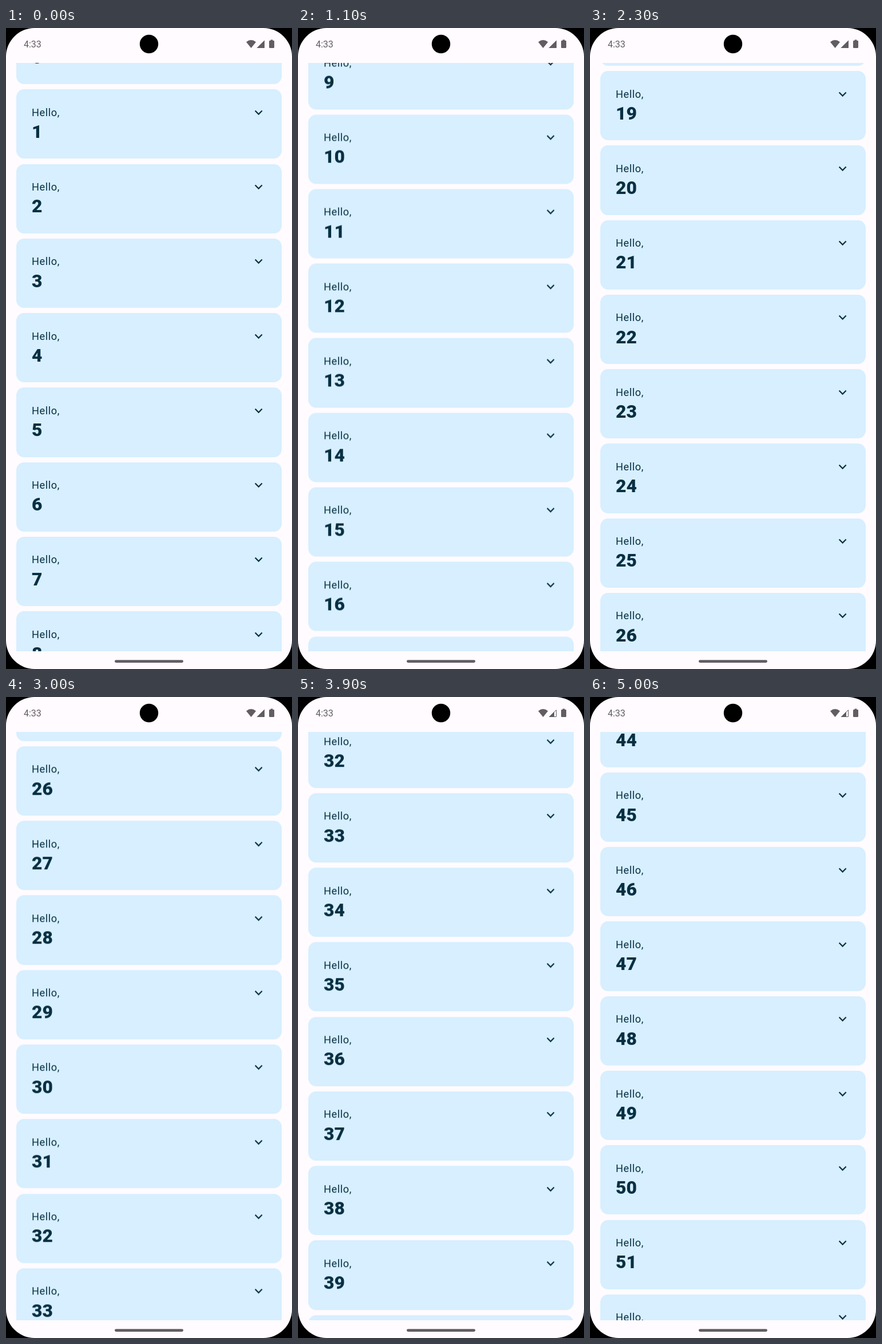
An HTML page that plays this animation: 500x1120 px, repeating every 5100 ms.

```html
<!DOCTYPE html>
<html lang="en">
<head>
<meta charset="utf-8">
<title>Greeting list</title>
<style>
  :root { --dp: 1.1364px; --pitch: 130.28px; }
  html, body { margin: 0; width: 500px; height: 1120px; overflow: hidden; background: #000; }
  .screen {
    position: relative; width: 500px; height: 1120px; overflow: hidden;
    border-radius: 50px; background: #fffbfe; font-family: Roboto, sans-serif;
  }
  .view { position: absolute; left: 0; top: 61px; width: 500px; height: 1027.5px; overflow: hidden; }
  .list { position: absolute; left: 18px; top: -61px; width: 464px; animation: scroll 5100ms infinite; }
  .card {
    position: relative; box-sizing: border-box; height: 121.2px;
    margin-bottom: calc(var(--pitch) - 121.2px); padding: 26.5px 27px;
    border-radius: calc(12 * var(--dp)); background: #d7efff; color: #073042;
  }
  .hello { font-size: calc(16 * var(--dp)); line-height: calc(24 * var(--dp)); letter-spacing: calc(.5 * var(--dp)); }
  .number { font-size: calc(28 * var(--dp)); line-height: calc(36 * var(--dp)); font-weight: 800; }
  .card svg { position: absolute; left: 410.4px; top: 26.5px; width: calc(24 * var(--dp)); height: calc(24 * var(--dp)); fill: #073042; }
  .chrome { position: absolute; left: 0; top: 0; fill: #615d62; }
  .chrome text { font: 16px Roboto, sans-serif; }
  .full { animation: weaken 5100ms step-end infinite; }

  /* Ten positions per second between the measured scroll offsets */
  @keyframes scroll {
    0% { transform: translateY(-23px); animation-timing-function: steps(11); }
    21.568% { transform: translateY(-1151.5px); animation-timing-function: steps(12); }
    45.098% { transform: translateY(-2400px); animation-timing-function: steps(7); }
    58.823% { transform: translateY(-3300.8px); animation-timing-function: steps(5); }
    68.627% { transform: translateY(-3677.2px); animation-timing-function: steps(8); }
    84.313% { transform: translateY(-4584.5px); animation-timing-function: steps(7); }
    98.039%, 100% { transform: translateY(-5730.1px); }
  }
  @keyframes weaken {
    0% { opacity: 1; }
    76.47%, 100% { opacity: 0; }
  }
</style>
</head>
<body>
<div class="screen">
  <div class="view"><div class="list" id="list"></div></div>
  <svg class="chrome" width="500" height="1120" viewBox="0 0 500 1120">
    <text x="31" y="34">4:33</text>
    <circle cx="250" cy="28" r="16.2" fill="#000"/>
    <path d="M420 24.4Q428.5 17.6 437 24.4L428.5 35Z"/>
    <path d="M439.8 34.4H451.5V22.7Z" fill="none" stroke="#615d62"/>
    <path d="M438.5 35H448V25.5Z"/>
    <path class="full" d="M438.5 35H452V21.5Z"/>
    <path d="M462.6 20.5h3.8v1.6h1.4q1.2 0 1.2 1.2v10.5q0 1.2-1.2 1.2h-6.6q-1.2 0-1.2-1.2v-10.5q0-1.2 1.2-1.2h1.4z"/>
    <rect x="190" y="1104.2" width="120" height="4.8" rx="2.4"/>
  </svg>
</div>
<script>
  const card = n => `<div class="card">
    <div class="hello">Hello,</div>
    <div class="number">${n}</div>
    <svg viewBox="0 0 24 24"><path d="M16.59 8.59 12 13.17 7.41 8.59 6 10l6 6 6-6z"/></svg>
  </div>`;
  document.getElementById('list').innerHTML = Array.from({ length: 54 }, (_, n) => card(n)).join('');
</script>
</body>
</html>
```
